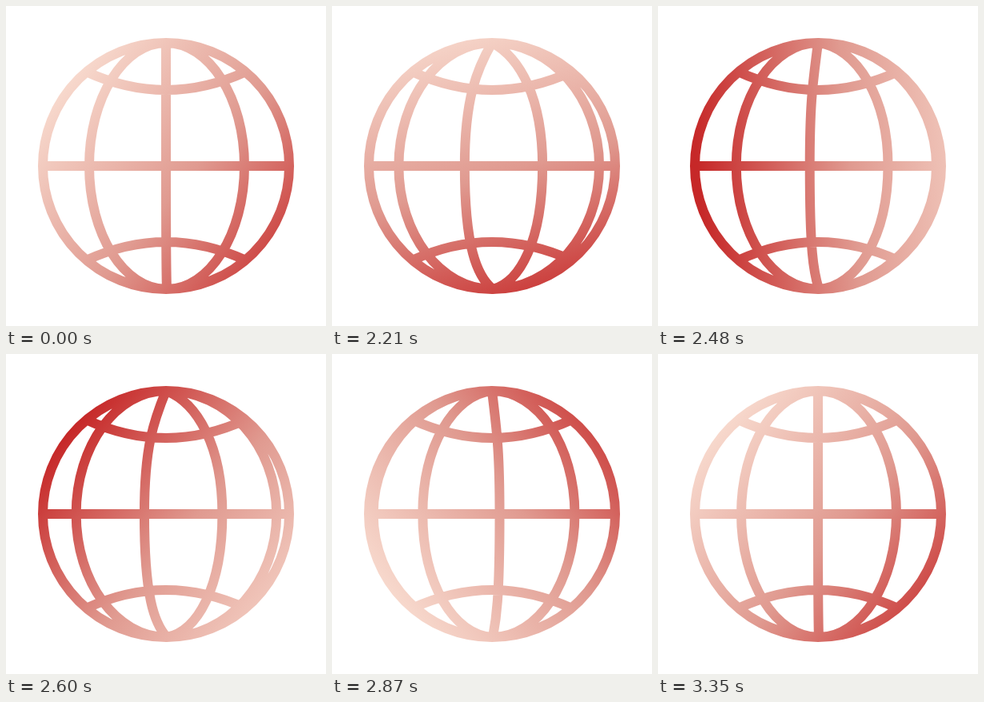
Write an HTML page with a canvas that moves like this. It is 400x400 px and loops after 3440 ms.

```html
<!DOCTYPE html>
<html lang="en">
<head>
<meta charset="utf-8">
<title>Spinning globe</title>
<style>
  html, body { margin: 0; width: 100%; height: 100%; overflow: hidden; background: #fff; }
  canvas { display: block; width: 100vmin; height: 100vmin; }
</style>
</head>
<body>
<canvas id="stage" width="400" height="400"></canvas>
<script>
const ctx = document.getElementById('stage').getContext('2d');
const LOOP = 3440, SPIN_START = 2000, STEP = 30, STEPS = 45;
const C = 200, R = 154, KAPPA = 0.5523;
const TURNS = 7;                          // meridian spacings passed per spin
const STOPS = [-R, -96, 0, 98, R];        // meridian positions on the equator

const clamp = v => Math.min(1, Math.max(0, v));
const bezier = (s, a, b) => 3 * s * (1 - s) ** 2 * a + 3 * s * s * (1 - s) * b + s ** 3;

// cubic-bezier(.167, .167, .46, 1)
function ease(x) {
  if (x <= 0 || x >= 1) return clamp(x);
  let lo = 0, hi = 1;
  for (let i = 0; i < 30; i++) {
    const mid = (lo + hi) / 2;
    if (bezier(mid, 0.167, 0.46) < x) lo = mid; else hi = mid;
  }
  return bezier(lo, 0.167, 1);
}

function gradient(step) {
  const angle = (40 + 360 * clamp((step - 4) / 32)) * Math.PI / 180;
  const cx = 240, half = 190;
  const dx = half * Math.cos(angle), dy = half * Math.sin(angle);
  const g = ctx.createLinearGradient(cx - dx, C - dy, cx + dx, C + dy);
  g.addColorStop(0, '#f7d8cc');
  g.addColorStop(0.5, '#e09a90');
  g.addColorStop(1, '#c62828');
  return g;
}

// phase runs from -2 (left rim) to 2 (right rim)
function meridian(phase) {
  const i = Math.min(3, Math.floor(phase + 2));
  const x = STOPS[i] + (STOPS[i + 1] - STOPS[i]) * (phase + 2 - i);
  const tipX = C + x * KAPPA;
  const flat = 1 - Math.min(1, Math.abs(phase));   // 1 for the straight central line
  const side = R * KAPPA;
  ctx.moveTo(C, C - R);
  ctx.bezierCurveTo(tipX, C - R + 51 * flat, C + x, C - side, C + x, C);
  ctx.bezierCurveTo(C + x, C + side + 25 * flat, tipX, C + R - 25 * flat, C + 1, C + R);
}

function parallel(dir) {
  ctx.moveTo(100, C + dir * 118);
  ctx.quadraticCurveTo(C, C + dir * 72, 300, C + dir * 118);
}

function draw(time) {
  const step = Math.min(STEPS, Math.max(0, Math.floor((time - SPIN_START) / STEP)));
  const shift = (TURNS * ease(step / STEPS)) % 1;
  const first = step > 1 ? -2 : -1;       // a new meridian enters once the spin is under way

  ctx.fillStyle = '#fff';
  ctx.fillRect(0, 0, 400, 400);
  ctx.strokeStyle = gradient(step);
  ctx.lineWidth = 12;
  ctx.beginPath();
  ctx.arc(C, C, R, 0, Math.PI * 2);
  ctx.moveTo(C - R, C);
  ctx.lineTo(C + R, C);
  parallel(-1);
  parallel(1);
  for (let k = first; k < 2; k++) meridian(k + shift);
  ctx.stroke();
}

const start = performance.now();
function tick() {
  draw((performance.now() - start) % LOOP);
  requestAnimationFrame(tick);
}
tick();
</script>
</body>
</html>
```
